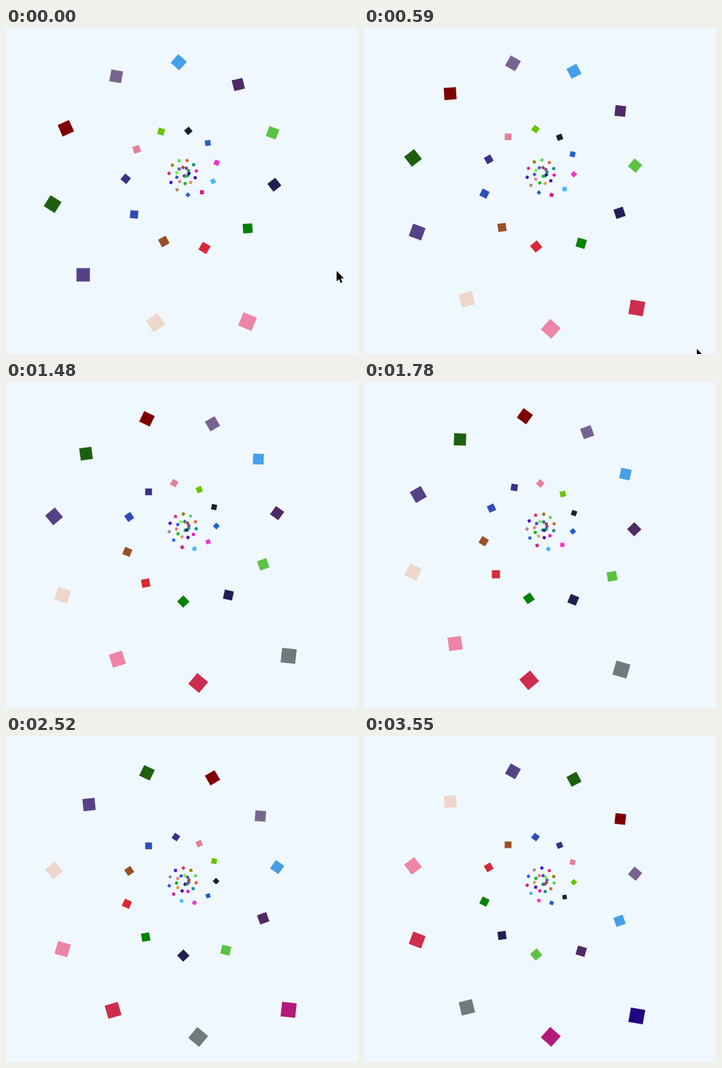
An HTML page with a canvas that plays this animation: 477 by 443 pixels, repeating every 3.65 s.

```html
<!DOCTYPE html>
<html lang="en">
<head>
<meta charset="utf-8">
<title>Spiral of squares</title>
<style>
  html, body { margin: 0; width: 100%; height: 100%; overflow: hidden; background: #f0f8ff; }
  canvas { display: block; }
</style>
</head>
<body>
<canvas id="stage" width="477" height="443"></canvas>
<script>
const ctx = document.getElementById('stage').getContext('2d');
const CENTER = { x: 242, y: 198 };
const LOOP = 3650;
const STEPS = 25;
const SHORT_STEPS = [0, 9, 12, 19, 22];
const TICKS_PER_STEP = 2.5;
const LIFETIME = 750;
const LAST_SPAWN = 55;

// Newest square first; three squares are born every 50 ticks.
const COLORS = `#240482 #b5197a #6f7a7a #cd2d4e #ee84a8 #edd6ca #564187 #1d5f10
  #7e0000 #79648f #469fe9 #4f2a66 #5bc242 #201f52 #048004 #d82837 #9a5026 #2f4db8
  #3a3187 #e3809a #68c400 #0f2328 #2160cb #f433cb #3fb8f7 #cf1f8d #2d5cd6 #b98a76
  #4a08d8 #d8306a #a07808 #5fd660 #dd6440 #168888 #f00cc0 #4608a8 #dfa04c #10b818
  #ee7a88 #2f55e0 #7cf044 #4a5fb8 #a0483c #77488f #1e8a80 #1a1478 #1f9a78 #30c840
  #5a1fa0`.split(/\s+/);
const squares = COLORS.map((color, i) => ({
  color,
  born: 22 - Math.round((i - 2) * 50 / 3)
})).reverse();

// Pointer tip at each step until it has left the stage.
const POINTER_PATH = [[448, 330], [448, 382], [450, 414], [451, 428], [451, 436], [450, 439], [448, 441]];
const POINTER = new Path2D('M0 0V14.2L3.3 11.2L5.5 16.4L7.8 15.4L5.6 10.3H10Z');

function stepAt(time) {
  let step = 0;
  let end = 0;
  while (step < STEPS - 1) {
    end += SHORT_STEPS.includes(step) ? 140 : 150;
    if (time < end) break;
    step++;
  }
  return step;
}

function drawSquare({ color, born }, tick) {
  const age = tick - born;
  if (age < 0 || age >= LIFETIME) return;
  const scale = Math.max(0.2, 1 - 0.002 * age);
  const offset = 160 - 0.2 * age;
  ctx.save();
  ctx.translate(CENTER.x, CENTER.y);
  ctx.rotate(age * Math.PI / 90);
  ctx.scale(scale, scale);
  ctx.fillStyle = color;
  ctx.fillRect(offset - 10, offset - 10, 20, 20);
  ctx.restore();
}

function drawPointer([x, y]) {
  ctx.save();
  ctx.translate(x, y);
  ctx.lineWidth = 2;
  ctx.strokeStyle = '#fff';
  ctx.stroke(POINTER);
  ctx.fillStyle = '#000';
  ctx.fill(POINTER);
  ctx.restore();
}

function draw(now) {
  const step = stepAt(now % LOOP);
  const tick = Math.floor(step * TICKS_PER_STEP);
  ctx.fillStyle = '#f0f8ff';
  ctx.fillRect(0, 0, 477, 443);
  squares.forEach(square => drawSquare(square, tick));
  if (step < POINTER_PATH.length) drawPointer(POINTER_PATH[step]);
}

let start;
function loop(now) {
  start ??= now;
  draw(now - start);
  requestAnimationFrame(loop);
}
draw(0);
requestAnimationFrame(loop);
</script>
</body>
</html>
```
